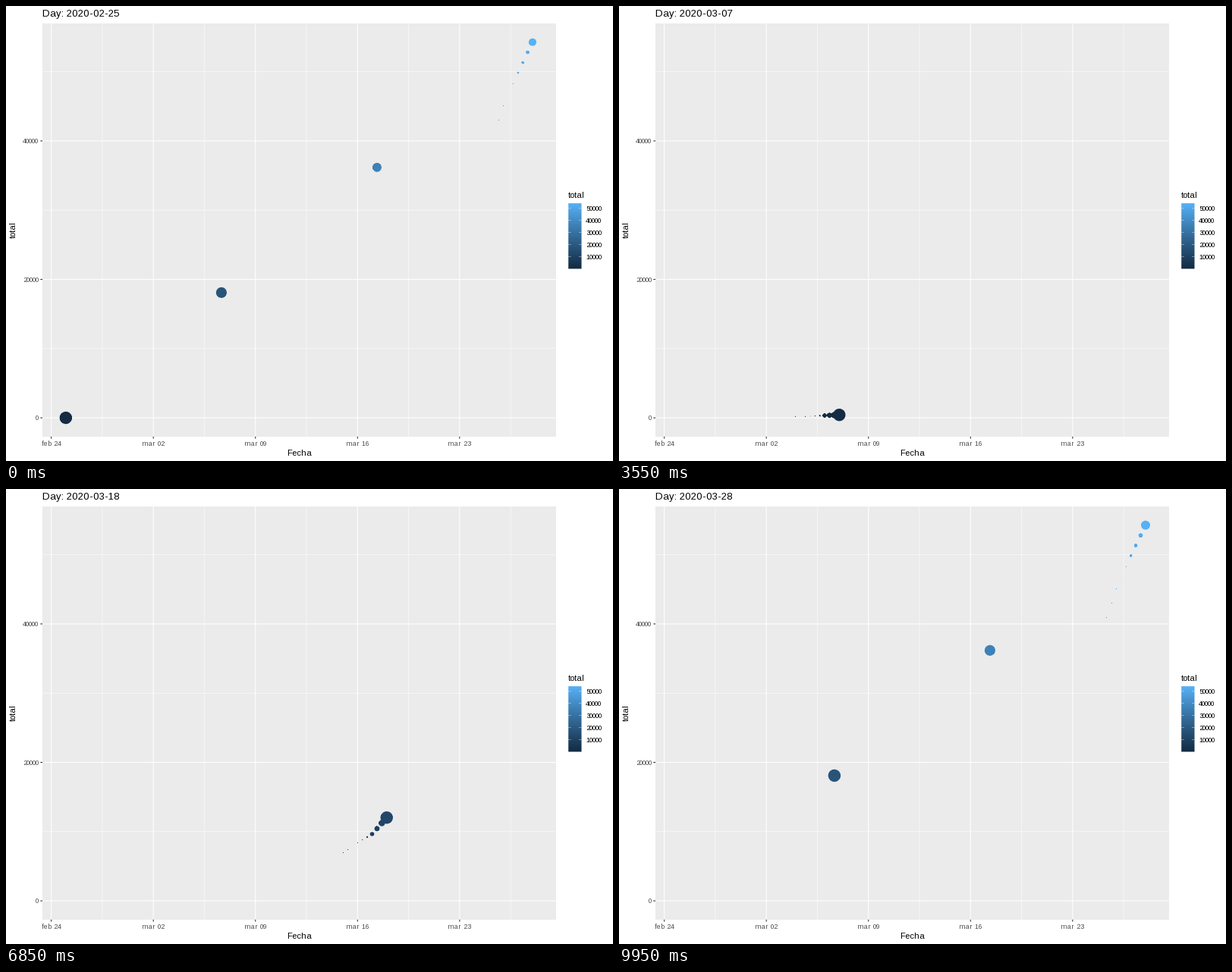
Recreate the animation shown at these times as a matplotlib script. Size 800 by 600 pixels, loop 10 s.

```python
import numpy as np
import matplotlib.pyplot as plt
from matplotlib.animation import FuncAnimation
from matplotlib.patches import Rectangle

W, H, DPI = 800, 600, 100
FRAMES, INTERVAL = 200, 50
WAKE = 20
LEFT, RIGHT, TOP, BOTTOM = 48.1, 724.7, 22.9, 567.8
DAY_W, Y0, UNIT = 19.222, 543.1, 182.6 / 20000
START = np.datetime64("2020-02-25")

# cumulative total for each day
TOTALS = [7, 13, 25, 34, 45, 60, 85, 120, 180, 230, 335, 430, 650, 935, 1430,
          1950, 2680, 3900, 5300, 6960, 8390, 9650, 12025, 14700, 17370,
          20700, 24280, 27540, 33200, 38800, 45080, 49850, 54260]
LOW, HIGH = TOTALS[0], TOTALS[-1]

plt.rcParams["font.family"] = "Liberation Sans"
plt.rcParams["text.hinting_factor"] = 1  # whole-pixel glyph advances

# colour scale: straight line in CIE Lab between two blues
RGB_XYZ = np.array([[0.4124564, 0.3575761, 0.1804375],
                    [0.2126729, 0.7151522, 0.0721750],
                    [0.0193339, 0.1191920, 0.9503041]])
WHITE = RGB_XYZ.sum(axis=1)
XYZ_LAB = np.array([[0, 116, 0], [500, -500, 0], [0, 200, -200]])


def to_lab(rgb):
    c = np.array(rgb) / 255
    lin = np.where(c > 0.04045, ((c + 0.055) / 1.055) ** 2.4, c / 12.92)
    t = RGB_XYZ @ lin / WHITE
    f = np.where(t > 0.008856, np.cbrt(t), 7.787 * t + 16 / 116)
    return XYZ_LAB @ f


def to_rgb(lab):
    f = np.linalg.solve(XYZ_LAB, lab)
    t = np.where(f > 0.2069, f ** 3, (f - 16 / 116) / 7.787)
    lin = np.clip(np.linalg.solve(RGB_XYZ, t * WHITE), 0, 1)
    return np.where(lin > 0.0031308, 1.055 * lin ** (1 / 2.4) - 0.055, 12.92 * lin)


DARK, LIGHT = to_lab([0x13, 0x2B, 0x43]), to_lab([0x56, 0xB1, 0xF7])


def shade(total):
    k = (total - LOW) / (HIGH - LOW)
    return to_rgb(DARK + (LIGHT - DARK) * k)


fig = plt.figure(figsize=(W / DPI, H / DPI), dpi=DPI, facecolor="white")
ax = fig.add_axes([0, 0, 1, 1])
ax.set_axis_off()


def line(xs, ys, color, px, z=2):
    ax.plot(xs, ys, color=color, lw=px * 72 / DPI, solid_capstyle="butt",
            snap=False, zorder=z)


def label(x, y, s, px, color="black", ha="left", **kw):
    return ax.text(x, y, s, fontsize=px * 72 / DPI, color=color, ha=ha,
                   va="baseline", zorder=6, **kw)


def x_of(day):
    return 78.85 + DAY_W * day


def y_of(total):
    return Y0 - total * UNIT


def draw_panel():
    ax.add_patch(Rectangle((LEFT, TOP), RIGHT - LEFT, BOTTOM - TOP,
                           fc="#EBEBEB", ec="none", zorder=1))
    for i in range(5):
        minor, major = x_of(2.5 + 7 * i), x_of(7 * i - 1)
        line([minor] * 2, [TOP, BOTTOM], "white", 0.53)
        line([major] * 2, [TOP, BOTTOM], "white", 1.07)
        line([major] * 2, [BOTTOM, BOTTOM + 2.75], "#333333", 1.07)
        name = str(START + 7 * i - 1)
        month = "feb" if name[5:7] == "02" else "mar"
        label(major, 580, f"{month} {name[8:]}", 9, "#4D4D4D", "center")
    for i in range(3):
        minor, major = y_of(10000 + 20000 * i), y_of(20000 * i)
        line([LEFT, RIGHT], [minor] * 2, "white", 0.53)
        line([LEFT, RIGHT], [major] * 2, "white", 1.07)
        line([LEFT - 2.75, LEFT], [major] * 2, "#333333", 1.07)
        label(43.2, major + 3.2, str(20000 * i), 9, "#4D4D4D", "right")
    label(386.5, 593, "Fecha", 11, ha="center")
    label(13, 294.5, "total", 11, ha="center", rotation=90,
          rotation_mode="anchor")


def draw_legend():
    x0, x1, top, bottom = 741.2, 758.5, 260.1, 346.5
    bar = np.array([[shade(t)] for t in np.linspace(HIGH, LOW, 87)])
    ax.imshow(bar, extent=(741, 759, 347, 260), aspect="auto",
              interpolation="nearest", zorder=2)
    # white frame softens the bar's part-covered edge pixels
    ax.add_patch(Rectangle((x0 - 0.5, top - 0.5), x1 - x0 + 1, bottom - top + 1,
                           fc="none", ec="white", lw=72 / DPI, snap=False,
                           zorder=3))
    label(741, 253, "total", 11)
    for total in range(10000, 60000, 10000):
        y = bottom - (total - LOW) / (HIGH - LOW) * (bottom - top)
        for a, b in ((x0, x0 + 3.46), (x1 - 3.46, x1)):
            line([a, b], [y, y], "white", 0.4, 3)
        label(764, y + 3.2, str(total), 9)


def pose(n):
    """Day shown in the title, plus the dot's day position and total."""
    day, step = divmod(max(n % FRAMES - 2, 0), 6)
    k = max(step - 3, 0) / 3
    nxt = (day + 1) % len(TOTALS)
    return day, day + (nxt - day) * k, TOTALS[day] + (TOTALS[nxt] - TOTALS[day]) * k


def stamp(img, x, y, k, color):
    """Hard-edged disc with a thin smooth rim, both scaled by k."""
    r, rim = 7.82 * k, 0.71 * k
    c0, r0 = int(x) - 11, int(y) - 11
    win = img[r0:r0 + 23, c0:c0 + 23]
    yy, xx = np.mgrid[r0:r0 + 23, c0:c0 + 23] + 0.5
    dist = np.hypot(xx - x, yy - y)
    edge = np.clip(rim / 2 + 0.5 - np.abs(dist - r), 0, min(rim, 1))
    a = np.where(dist < max(r, 0.5), 1.0, edge)[..., None]
    under = win[..., 3:] * (1 - a)
    alpha = a + under
    win[..., :3] = (color * a + win[..., :3] * under) / np.maximum(alpha, 1e-6)
    win[..., 3:] = alpha


draw_panel()
draw_legend()
title = label(48, 14, "", 13)
dots = ax.imshow(np.zeros((H, W, 4)), extent=(0, W, H, 0), aspect="auto",
                 interpolation="nearest", zorder=5)
ax.set_xlim(0, W)
ax.set_ylim(H, 0)


def update(n):
    img = np.zeros((H, W, 4))
    for age in range(WAKE - 1, -1, -1):
        _, day, total = pose(n - age)
        stamp(img, x_of(day), y_of(total), (1 - age / WAKE) ** 3, shade(total))
    dots.set_data((img * 255 + 0.5).astype(np.uint8))
    title.set_text(f"Day: {START + pose(n)[0]}")
    return dots, title


anim = FuncAnimation(fig, update, frames=FRAMES, interval=INTERVAL,
                     repeat=True, repeat_delay=0)
plt.show()
```
